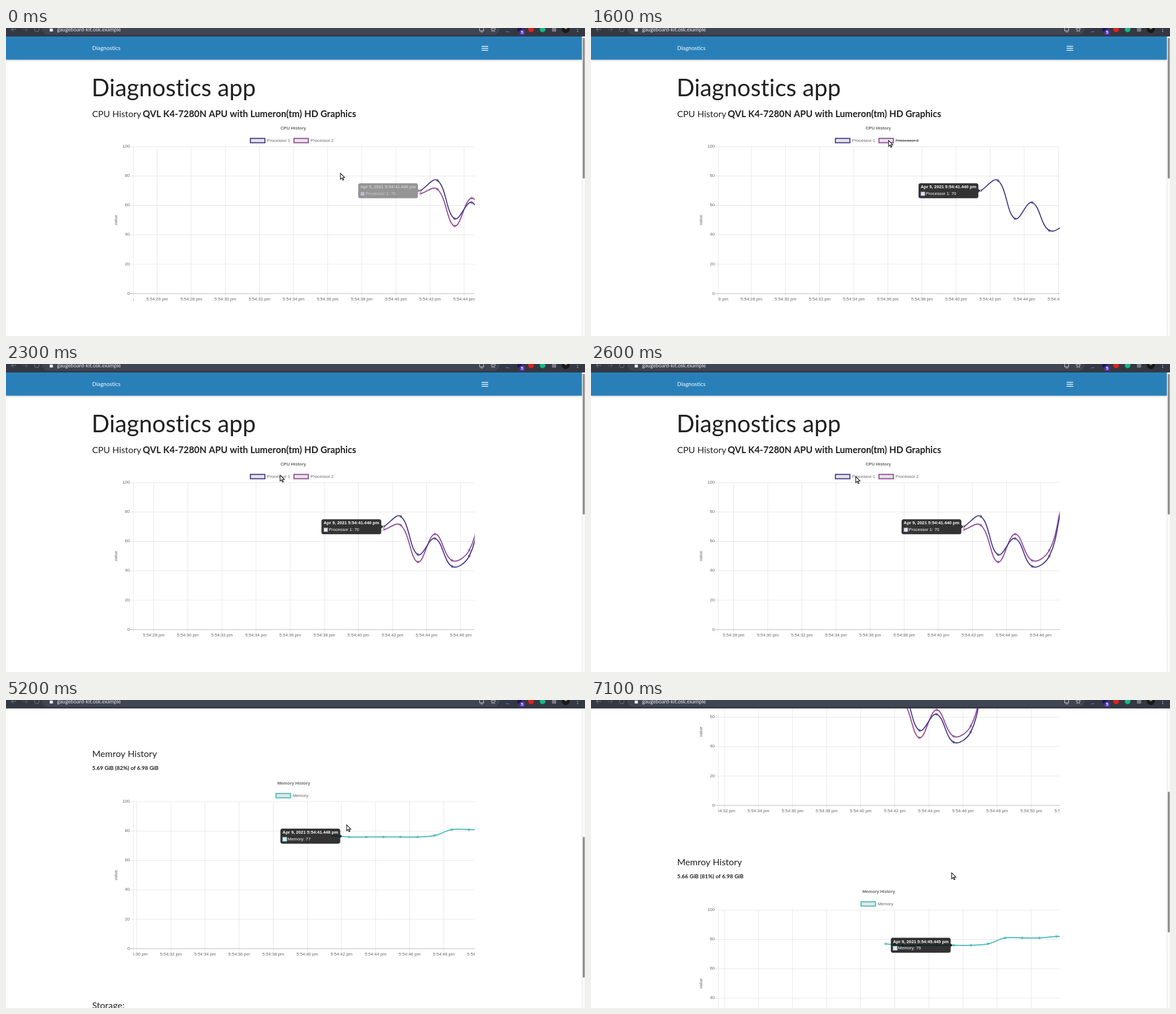
Animation of 1025x546 px, one loop 8 s. Source, as an HTML page with a canvas:

```html
<!DOCTYPE html>
<html lang="en">
<head>
<meta charset="utf-8">
<title>Diagnostics</title>
<style>
html, body { margin: 0; width: 100%; height: 100%; overflow: hidden; background: #fff; }
canvas { display: block; }
</style>
</head>
<body>
<canvas id="stage" width="1025" height="546"></canvas>
<script>
const ctx = document.getElementById('stage').getContext('2d');
const LOOP = 8000;
const U = 0.640625;              // one page pixel on the stage
const LEFT = 225.3, RIGHT = 829.8, UNIT = 2.605, SECOND = 30.19;
const CHART = '"Liberation Sans", Arial, sans-serif';
const PAGE = 'Lato, "Noto Sans", sans-serif';
const SMALL = `${12 * U}px ${CHART}`;

const cpu = {
  top: 210.3, title: 'CPU History', start: 41.44,
  series: [
    { name: 'Processor 1', color: '#483d8b', legend: 432.7,
      values: [70, 77, 51, 62, 43, 50, 90, 93, 91, 92, 90, 91] },
    { name: 'Processor 2', color: '#934e98', legend: 509.7,
      values: [68, 71, 46, 65, 47, 54, 91, 94, 92, 93, 91, 92] }
  ]
};
const memory = {
  top: 656.3, title: 'Memory History', start: 41.448,
  series: [
    { name: 'Memory', color: '#4dbdbd', legend: 478,
      values: [77, 76, 76, 76, 76, 76, 77, 81, 81, 81, 82, 82] }
  ]
};

// Keys: time, x of 5:54:26 on the grid, how far the lines trail behind the grid
const ORIGIN = [[0, 267.5, 0], [700, 249.7, 0], [1100, 237.6, 0], [1600, 223.6, 0.3],
  [2300, 201.1, 1.4], [3000, 180.2, 2.1], [5200, 110.8, 0], [6100, 84, 0], [7100, 54.8, 0]];
const POINTER = [[0, 592, 257.5], [600, 592, 257.5], [1000, 526.8, 199.3], [2000, 526.8, 199.3],
  [2300, 485.2, 197], [2700, 463.2, 200.6], [3000, 463.2, 200.6], [5200, 603, 221.3], [7100, 638.5, 306.3]];

function at(keys, t) {
  let i = 0;
  while (i < keys.length - 2 && t >= keys[i + 1][0]) i++;
  const a = keys[i], b = keys[i + 1];
  const f = Math.min(1, (t - a[0]) / (b[0] - a[0]));
  return a.slice(1).map((v, k) => v + (b[k + 1] - v) * f);
}

function recorded(t) {
  if (t < 700) return 0;
  if (t >= 1200 && t < 1400) return 1200;
  if (t < 3000) return Math.floor(t / 100) * 100;
  return t < 5200 ? 3000 : t < 6100 ? 5200 : t < 7100 ? 6100 : 7100;
}

function text(str, x, y, font, color, align = 'left', base = 'alphabetic') {
  ctx.font = font;
  ctx.letterSpacing = '0.01px';  // turns ligatures off
  ctx.fillStyle = color;
  ctx.textAlign = align;
  ctx.textBaseline = base;
  ctx.fillText(str, x, y);
}

function rect(x, y, w, h, color, r = 0) {
  ctx.fillStyle = color;
  ctx.beginPath();
  ctx.roundRect(x, y, w, h, r);
  ctx.fill();
}

function line(points, color, width) {
  ctx.strokeStyle = color;
  ctx.lineWidth = width;
  ctx.beginPath();
  points.forEach(([x, y]) => ctx.lineTo(x, y));
  ctx.stroke();
}

function disc(x, y, r, color) {
  ctx.fillStyle = color;
  ctx.beginPath();
  ctx.arc(x, y, r, 0, 7);
  ctx.fill();
}

function place(chart, s, i, origin) {
  return [origin + (chart.start + i * 1.003 - 26) * SECOND,
    chart.top + (100 - s.values[i]) * UNIT];
}

function drawSeries(chart, s, origin) {
  const pts = s.values.map((v, i) => place(chart, s, i, origin));
  const handles = pts.map((p, i) => {
    const a = pts[i - 1] || p, b = pts[i + 1] || p;
    const da = Math.hypot(p[0] - a[0], p[1] - a[1]), db = Math.hypot(b[0] - p[0], b[1] - p[1]);
    const fa = 0.4 * da / (da + db), fb = 0.4 * db / (da + db);
    return [0, 1].map(k => [p[k] - fa * (b[k] - a[k]), p[k] + fb * (b[k] - a[k])]);
  });
  ctx.strokeStyle = s.color;
  ctx.lineWidth = 3 * U;
  ctx.beginPath();
  ctx.moveTo(...pts[0]);
  for (let i = 1; i < pts.length; i++) {
    const [hx, hy] = handles[i - 1], [kx, ky] = handles[i];
    ctx.bezierCurveTo(hx[1], hy[1], kx[0], ky[0], ...pts[i]);
  }
  ctx.stroke();
  ctx.lineWidth = U;
  for (const [x, y] of pts) {
    disc(x, y, 3 * U, 'rgba(0,0,0,.1)');
    ctx.stroke();
  }
}

function drawChart(chart, origin, lag, hidden) {
  const { top } = chart, bottom = top + 100 * UNIT;
  const grid = 'rgba(0,0,0,.1)';
  text(chart.title, chart === cpu ? 508.5 : 509.5, top - 32, `bold ${SMALL}`, '#666', 'center', 'middle');
  chart.series.forEach((s, i) => {
    const x = s.legend, y = top - 10.7;
    rect(x, y - 3.9, 40 * U, 12 * U, '#e5e5e5');
    ctx.strokeStyle = s.color;
    ctx.lineWidth = 3 * U;
    ctx.strokeRect(x, y - 3.9, 40 * U, 12 * U);
    text(s.name, x + 29.4, y, SMALL, '#666', 'left', 'middle');
    if (i === hidden) line([[x + 29.4, y], [x + 29.4 + ctx.measureText(s.name).width, y]], '#666', 2 * U);
  });
  for (let v = 0; v <= 100; v += 20) {
    const y = bottom - v * UNIT;
    line([[219, y], [RIGHT, y]], v ? grid : 'rgba(0,0,0,.3)', 0.9);
    text(v, 219, y - 0.3, SMALL, '#666', 'right', 'middle');
  }
  line([[LEFT, top], [LEFT, bottom + 6]], grid, 0.9);
  ctx.save();
  ctx.translate(195.3, top + 130);
  ctx.rotate(-Math.PI / 2);
  text('value', 0, 0, SMALL, '#666', 'center', 'middle');
  ctx.restore();

  ctx.save();
  ctx.beginPath();
  ctx.rect(LEFT, top - 2, RIGHT - LEFT, 300);
  ctx.clip();
  for (let s = 22; s < 56; s += 2) {
    const x = origin + (s - 26) * SECOND;
    line([[x, top], [x, bottom + 6]], grid, 0.9);
    text(`5:54:${s} pm`, x, bottom + 9.8, SMALL, '#666', 'center', 'middle');
  }
  for (let i = chart.series.length - 1; i >= 0; i--)
    if (i !== hidden) drawSeries(chart, chart.series[i], origin + lag);
  ctx.restore();
}

function drawTip(chart, s, i, stamp, origin, dx = -4.3, dy = 0, alpha = 1) {
  const [px, py] = place(chart, s, i, origin);
  const w = 105.9, h = 26.6, x = px + dx - w, y = py + dy - h / 2, c = y + h / 2;
  ctx.save();
  ctx.globalAlpha = alpha;
  ctx.fillStyle = 'rgba(0,0,0,.8)';
  ctx.beginPath();
  ctx.roundRect(x, y, w, h, 6 * U);
  ctx.moveTo(x + w, c - 3.2);
  ctx.lineTo(x + w + 3.2, c);
  ctx.lineTo(x + w, c + 3.2);
  ctx.fill();
  text(`Apr 9, 2021 5:54:${stamp} pm`, x + 3.84, y + 7.2, `bold ${SMALL}`, '#fff', 'left', 'middle');
  rect(x + 3.84, y + 14.8, 7.7, 7.7, '#fff');
  ctx.strokeStyle = s.color;
  ctx.lineWidth = U;
  ctx.strokeRect(x + 4.16, y + 15.1, 7.05, 7.05);
  rect(x + 4.5, y + 15.4, 6.4, 6.4, 'rgba(0,0,0,.1)');
  text(`${s.name}: ${s.values[i]}`, x + 12.8, y + 18.5, SMALL, '#fff', 'left', 'middle');
  ctx.restore();
}

function drawPage(t, origin, lag) {
  ctx.save();
  ctx.shadowColor = 'rgba(0,0,0,.3)';
  ctx.shadowBlur = 3;
  ctx.shadowOffsetY = 1;
  rect(0, 15, 1020, 41, '#2980b9');
  ctx.restore();
  text('Diagnostics', 152.5, 39.2, `9.9px ${PAGE}`, '#fff');
  for (const y of [32.5, 36, 39.5]) line([[842, y], [853.5, y]], '#fff', 1.3);
  text('Diagnostics app', 151.5, 121, `41.8px ${PAGE}`, '#212121');
  text('CPU History', 152.5, 158, `15.8px ${PAGE}`, '#212121');
  text('QVL K4-7280N APU with Lumeron(tm) HD Graphics', 242, 158, `bold 16.2px ${PAGE}`, '#212121');

  const hidden = t >= 1400 && t < 1900 ? 1 : t >= 2900 && t < 5200 ? 0 : -1;
  drawChart(cpu, origin, lag, hidden);
  const data = origin + lag;
  if (t < 5200) {
    const swap = hidden === 0;
    drawTip(cpu, cpu.series[swap ? 1 : 0], 0, '41.440', data,
      swap ? -2.4 : -4.3, swap ? -3.9 : 0, t ? 1 : 0.52);
  }

  text('Memroy History', 152.5, 577, `16px ${PAGE}`, '#212121');
  text(`${t < 6100 ? '5.69 GiB (82%)' : '5.66 GiB (81%)'} of 6.98 GiB`, 152.5, 600,
    `bold 9.9px ${PAGE}`, '#212121');
  drawChart(memory, origin, lag, -1);
  const m = memory.series[0];
  if (t === 5200) drawTip(memory, m, 0, '41.448', data, 14.5, 1.2);
  if (t === 6100) drawTip(memory, m, 2, '43.446', data);
  if (t === 7100) drawTip(memory, m, 4, '45.445', data, -5.6);
  text('Storage:', 152.5, 1023, `16px ${PAGE}`, '#212121');
}

function drawBrowser(thumb) {
  rect(1020, 15, 5, 531, '#fafafa');
  line([[1019.8, 15], [1019.8, 546]], '#dcdcdc', 0.7);
  rect(1021, thumb, 3.6, 249.7, '#8e8e8e', 1.8);

  rect(0, 0, 1025, 15, '#343843');
  rect(64, -12, 810, 24, '#404552', 11);
  const dim = '#70747c', pale = '#c9ccd1';
  line([[18, 2.5], [9.5, 2.5]], dim, 1.1);
  line([[13, -1], [9.5, 2.5], [13, 6]], dim, 1.1);
  line([[29.5, 2.5], [38, 2.5]], '#555962', 1.1);
  line([[34.5, -1], [38, 2.5], [34.5, 6]], '#555962', 1.1);
  ctx.strokeStyle = dim;
  ctx.lineWidth = 1.1;
  ctx.beginPath();
  ctx.arc(54.5, 2.5, 4, -0.5, 5);
  ctx.stroke();
  rect(77.3, 1, 5.8, 5.2, '#e8eaed', 0.8);
  text('gaugeboard-kit.osk.example', 90.5, 6.3, `9.2px ${PAGE}`, '#e8eaed');

  ctx.strokeStyle = pale;
  ctx.lineWidth = 1;
  ctx.strokeRect(838.5, -2, 7, 7);
  line([[840, 7], [844.5, 7]], pale, 1);
  const star = Array.from({ length: 11 }, (_, i) => {
    const r = i % 2 ? 1.9 : 4.4, a = i * Math.PI / 5 - Math.PI / 2;
    return [862.5 + r * Math.cos(a), 2.7 + r * Math.sin(a)];
  });
  line(star, pale, 0.9);
  rect(885, 6, 6, 1.3, '#3f74e0');
  disc(909, 2.5, 4, '#1d1553');
  rect(909.5, 3.5, 8.5, 8.5, '#5a35c8', 1.5);
  text('5', 913.8, 10.3, `bold 7px ${CHART}`, '#fff', 'center');
  disc(929.5, 2.5, 5, '#e0251b');
  disc(950, 2.5, 5, '#16b982');
  rect(966.5, -1, 7.5, 7.5, '#777b82', 1);
  disc(991, 2, 7, '#17181a');
  disc(991, -0.5, 2.7, '#8b7f79');
  for (const y of [-0.8, 2.7, 6.2]) disc(1012, y, 0.9, '#b4b7bc');
}

function drawPointer([x, y]) {
  const shape = [[0, 0], [0, 10.6], [2.5, 8.4], [4.2, 12.2], [5.9, 11.4], [4.2, 7.8], [7.6, 7.6]];
  ctx.beginPath();
  shape.forEach(([a, b]) => ctx.lineTo(x + a, y + b));
  ctx.closePath();
  ctx.fillStyle = '#fff';
  ctx.fill();
  ctx.strokeStyle = '#111';
  ctx.lineWidth = 1.1;
  ctx.stroke();
}

function draw(now) {
  const t = recorded(now % LOOP);
  const [origin, lag] = at(ORIGIN, t);
  const [scroll, thumb] = t < 5200 ? [0, 17.3] : t < 6100 ? [476, 242.6] : t < 7100 ? [380, 202.5] : [284, 162.6];
  rect(0, 0, 1025, 546, '#fff');
  ctx.save();
  ctx.translate(0, -scroll);
  drawPage(t, origin, lag);
  ctx.restore();
  drawBrowser(thumb);
  drawPointer(at(POINTER, t));
}

const begin = performance.now();
function tick() {
  draw(performance.now() - begin);
  requestAnimationFrame(tick);
}
tick();
</script>
</body>
</html>
```
